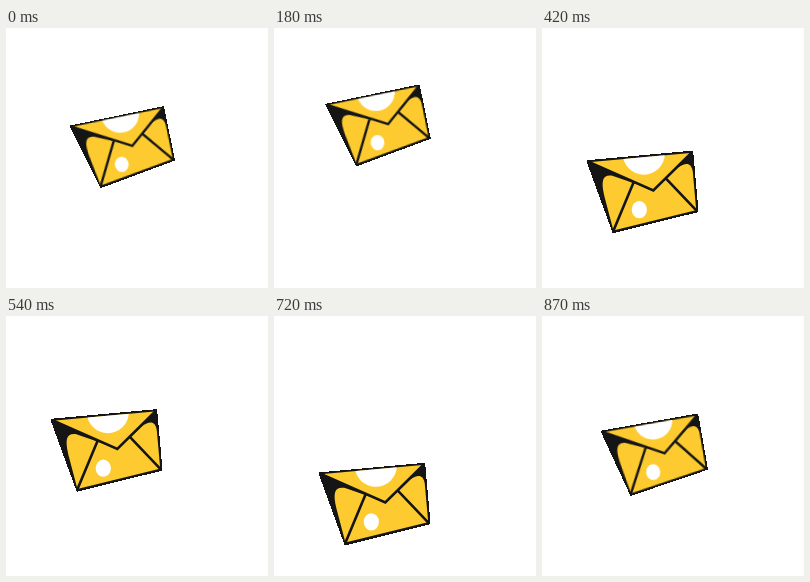
Animation of 262x260 px, one loop 0.9 s. Source, as an HTML page without scripts:

```html
<!DOCTYPE html>
<html lang="en">
<head>
<meta charset="utf-8">
<title>Bouncing envelope</title>
<style>
  @property --tick {
    syntax: "<number>";
    inherits: true;
    initial-value: 0;
  }

  html, body {
    margin: 0;
    width: 100%;
    height: 100%;
    overflow: hidden;
    background: #fff;
  }

  svg {
    display: block;
    width: 100%;
    height: 100%;
  }

  .envelope {
    /* progress of each stage: swing, settle, drop, hop, drop, fling */
    --swing: clamp(0, var(--tick) / 6, 1);
    --settle: clamp(0, (var(--tick) - 6) / 4, 1);
    --drop1: clamp(0, (var(--tick) - 10) / 6, 1);
    --hop: clamp(0, (var(--tick) - 16) / 4, 1);
    --drop2: clamp(0, (var(--tick) - 20) / 6, 1);
    --fling: clamp(0, (var(--tick) - 26) / 4, 1);

    /* decelerating versions */
    --swing-out: calc(var(--swing) * (2 - var(--swing)));
    --drop1-out: calc(var(--drop1) * (2 - var(--drop1)));
    --hop-out: calc(var(--hop) * (1.56 - .56 * var(--hop)));
    --drop2-out: calc(var(--drop2) * (2 - var(--drop2)));

    --x: calc(15.8 - 12.25 * var(--swing-out) - 3.25 * var(--settle) + 15.5 * var(--fling));
    --y: calc(-14 - 21.75 * var(--swing-out) + 14.75 * var(--settle)
      + 57.25 * var(--drop1-out) - 56 * var(--hop-out)
      + 83 * var(--drop2-out) - 77.25 * var(--fling));
    --tilt: calc(1 - var(--settle) + var(--fling));

    transform-origin: 105.25px 131px;
    transform:
      translate(calc(var(--x) * 1px), calc(var(--y) * 1px))
      rotate(calc(var(--tilt) * -6.5deg))
      scale(calc(1 - .1 * var(--tilt)));
    animation: play 900ms steps(30) infinite;
  }

  @keyframes play {
    from { --tick: 0; }
    to { --tick: 30; }
  }

  .ink { fill: #151515; stroke: #151515; stroke-width: 2.4; stroke-linejoin: round; shape-rendering: crispEdges; }
  .paper { fill: #fdcb2f; }
  .crease { fill: none; stroke: #151515; stroke-width: 2.6; }
  .spot { fill: #fff; }
</style>
</head>
<body>
<svg viewBox="0 0 262 260" aria-label="Envelope">
  <defs>
    <clipPath id="flap"><path d="M49 104 148 95 111 132.5Z"/></clipPath>
    <filter id="soften"><feGaussianBlur stdDeviation=".4"/></filter>
  </defs>
  <g class="envelope">
    <path class="ink" d="M45.5 103.5 149.7 94 155 153.2 71.2 174Z"/>
    <g filter="url(#soften)">
      <g class="paper">
        <path d="M71 172 62 138C58.5 123 60 116.5 70 117.8L91 125Z"/>
        <path d="M124 121 136 109.5C143 104.5 149 104 150.5 114L153.8 151Z"/>
        <path d="M72 172.3 91 125 111 132.5 124 121 153.5 152.3Z"/>
        <path d="M49 104 148 95 111 132.5Z"/>
      </g>
      <circle class="spot" cx="101.5" cy="95.8" r="21" clip-path="url(#flap)"/>
      <ellipse class="spot" cx="97" cy="151.8" rx="7.6" ry="8.6"/>
      <path class="crease" d="M71 173 91 125M124 121 154 152.5M47 104.2 111 132.5 149 95"/>
    </g>
  </g>
</svg>
</body>
</html>
```
